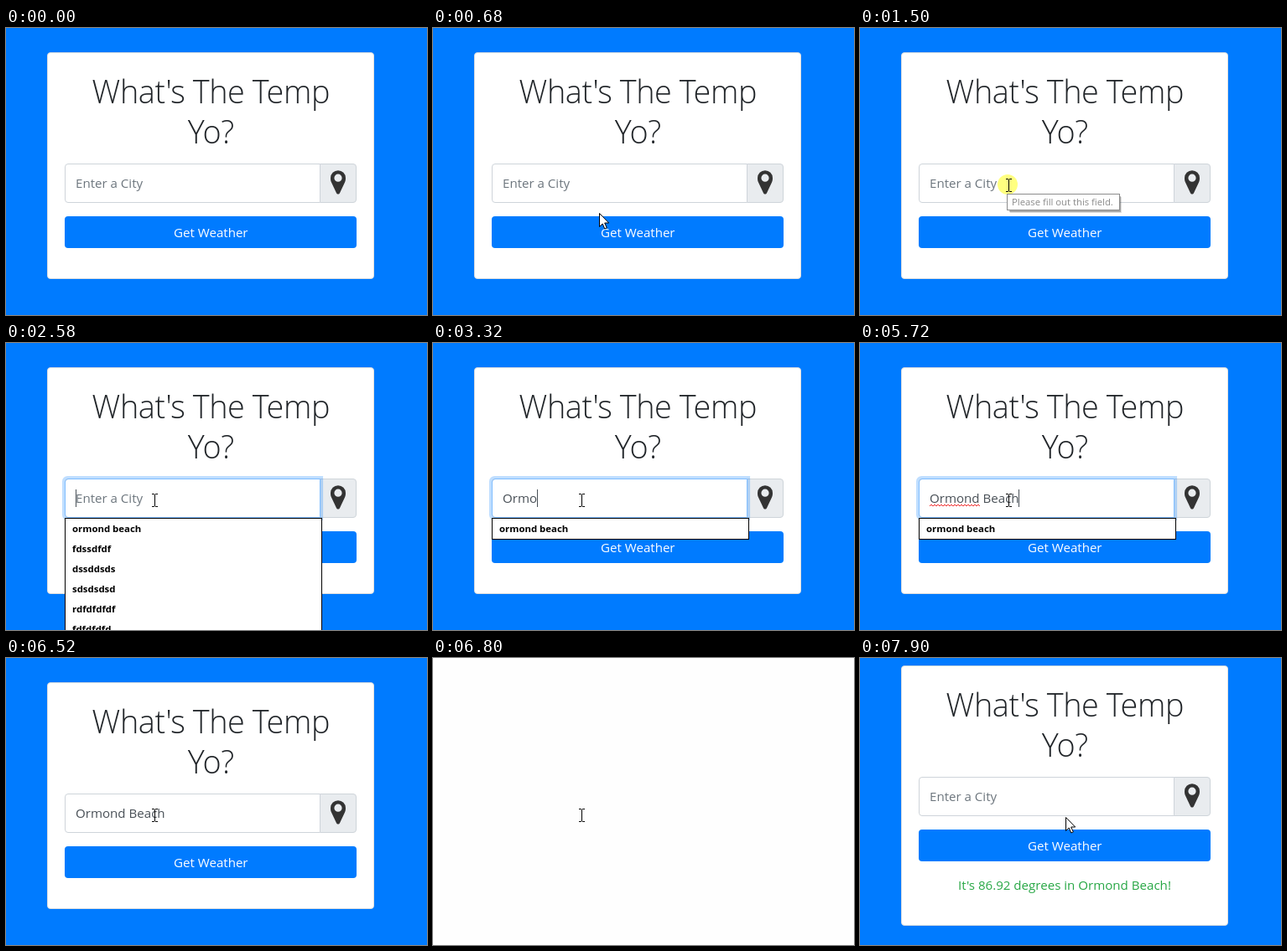
Recreate the animation shown at these times as an HTML page. Size 502 px wide and 343 px high, loop 7950 ms.

```html
<!DOCTYPE html>
<html lang="en">
<head>
<meta charset="utf-8">
<title>What's The Temp Yo?</title>
<style>
  html, body { margin: 0; width: 100%; height: 100%; overflow: hidden; background: #007bff; }
  svg { display: block; width: 502px; height: 343px; }
  text { font-family: "Open Sans", "Noto Sans", sans-serif; font-size: 15.1px; white-space: pre; }
  .title { font-size: 37.8px; font-weight: 300; letter-spacing: -.4px; fill: #212529; }
  .mid { text-anchor: middle; }
  .label { font-weight: 500; fill: #fff; }
  .rows text { font-size: 11.4px; font-weight: 700; }
  .tip text { font-size: 11.3px; fill: #8a8a8a; }
  .crisp { shape-rendering: crispEdges; }
  #press { mix-blend-mode: multiply; }
</style>
</head>
<body>
<svg viewBox="0 0 502 343">
  <rect width="502" height="343" fill="#007bff"/>
  <rect id="card" x="49.5" y="29.5" width="389" height="270" rx="3.5" fill="#fff" stroke="#dfdfdf"/>

  <g id="form">
    <text class="title mid" x="244.3" y="90">What's The Temp</text>
    <text class="title mid" x="244.3" y="138">Yo?</text>

    <path d="M374.5 162.5H414a3.5 3.5 0 0 1 3.5 3.5V205a3.5 3.5 0 0 1-3.5 3.5H374.5z" fill="#e9ecef" stroke="#ced4da"/>
    <path d="M396 198.5c-1 0-1.6-.5-2.1-1.5l-5.9-12.5c-.8-1.6-1-3.5-1-5.3a9 9 0 0 1 18 0c0 1.8-.2 3.7-1 5.3l-5.9 12.5c-.5 1-1.1 1.5-2.1 1.5zM396 174.6a4.6 4.6 0 1 0 0 9.2a4.6 4.6 0 0 0 0-9.2z" fill="#333"/>
    <path d="M374.5 162.5H74a3.5 3.5 0 0 0-3.5 3.5V205a3.5 3.5 0 0 0 3.5 3.5H374.5z" fill="#fff" stroke="#ced4da"/>

    <g id="focus" fill="none">
      <path d="M376.5 160.6H73.5a4.8 4.8 0 0 0-4.9 4.8V205.6a4.8 4.8 0 0 0 4.9 4.8H376.5z" stroke="#007bff" stroke-opacity=".25" stroke-width="3.2"/>
      <path d="M374.5 162.5H74a3.5 3.5 0 0 0-3.5 3.5V205a3.5 3.5 0 0 0 3.5 3.5H374.5z" stroke="#80bdff"/>
    </g>

    <text id="hint" x="83" y="191" fill="#6c757d">Enter a City</text>
    <text id="typed" x="83" y="191" fill="#495057"></text>
    <path id="squiggle" fill="none" stroke="#f03030"/>
    <rect id="caret" class="crisp" y="175" width="1" height="21" fill="#495057"/>

    <rect id="button" x="70" y="225" width="348" height="38" rx="4"/>
    <text class="label mid" x="244.3" y="250">Get Weather</text>
  </g>

  <text id="result" class="mid" x="244" y="277" fill="#28a745">It's 86.92 degrees in Ormond Beach!</text>

  <g id="list" class="rows">
    <rect id="panel" class="crisp" x="70.5" y="209.5" width="306" fill="#fff" stroke="#000"/>
  </g>

  <rect id="blank" width="502" height="343" fill="#fefefe"/>

  <circle id="press" cx="176" cy="187" r="12" fill="#ffff80"/>
  <g id="tip" class="tip">
    <rect x="179" y="202" width="133" height="19" fill="#000" opacity=".12"/>
    <rect x="178" y="201" width="133" height="19" fill="#000" opacity=".25"/>
    <rect x="175.5" y="198.5" width="134" height="19" fill="#fff" stroke="#8c8c8c"/>
    <text x="181" y="212">Please fill out this field.</text>
  </g>

  <path id="beam" class="crisp" d="M-3-8h3v1h-3zM1-8h3v1h-3zM0-7h1v14h-1zM-3 7h3v1h-3zM1 7h3v1h-3z"/>
  <path id="arrow" d="M.5.5V16.5l3.7-3.5 2.6 6 2.5-1.1-2.6-5.900h5z" fill="#fff" stroke="#000"/>
  <path id="hand" d="M-1.5 9V1.5a1.5 1.5 0 0 1 3 0V7l7 1.5q2 .5 2 2.5v4l-2 5H0l-6-8q-.5-2.5 2-2l2.5 2z" fill="#fff" stroke="#000"/>
</svg>

<script>
const LOOP = 7950;
const el = {};
document.querySelectorAll('[id]').forEach(n => el[n.id] = n);

const clamp = v => Math.max(0, Math.min(1, v));
const ramp = (t, a, b) => clamp((t - a) / (b - a));
const within = (t, a, b) => t >= a && t < b;
const show = (node, on) => node.setAttribute('visibility', on ? 'visible' : 'hidden');
const place = (node, x, y) => node.setAttribute('transform', `translate(${Math.round(x)} ${Math.round(y)})`);
const mix = (a, b, p) => a + (b - a) * p;

const ticks = (t, start, step, count) => clamp((Math.floor((t - start) / step) + 1) / count);

const CITY = 'Ormond Beach';
const KEYS = [2760, 3040, 3140, 3320, 3500, 3600, 3680, 3910, 4060, 4240, 4520, 4700];
const ENTRIES = ['ormond beach', 'fdssdfdf', 'dssddsds', 'sdsdsdsd', 'rdfdfdfdf', 'fdfdfdfd'];
const SHORT_ENTRIES = ['ormond beach', 'odfdfdf'];

const rows = ENTRIES.map((_, i) => {
  const row = document.createElementNS('http://www.w3.org/2000/svg', 'text');
  row.setAttribute('x', 79);
  row.setAttribute('y', 226 + 24 * i);
  el.list.append(row);
  return row;
});

let wave = 'M83 195';
for (let x = 85; x <= 143; x += 2) wave += `L${x} ${x % 4 === 1 ? 193 : 195}`;
el.squiggle.setAttribute('d', wave);

function pointer(t) {
  if (t < 250) return null;
  if (t < 1090) {
    const p = ticks(t, 250, 50.7, 15), e = p * (2 - p);
    return [mix(262, 186, e), mix(338, 199, e)];
  }
  if (t < 6850) {
    const p = ticks(t, 1090, 56, 4);
    return [mix(186, 177, p), mix(199, 188, p)];
  }
  if (t < 7440) return null;
  if (t < 7670) return [177, 188];
  const p = ticks(t, 7670, 46, 6);
  return [mix(177, 245, p * p), 188 + 2 * p - 4 * Math.sin(Math.PI * p)];
}

function drawPointer(t, shift) {
  const at = pointer(t);
  let kind = '';
  if (at) {
    const y = at[1] - shift;
    kind = y < 209 ? 'beam' : within(y, 225, 263) ? 'hand' : 'arrow';
  }
  for (const name of ['beam', 'arrow', 'hand']) {
    show(el[name], name === kind);
    if (name === kind) place(el[name], ...at);
  }
  el.button.setAttribute('fill', kind === 'hand' ? '#0069d9' : '#007bff');
}

function drawField(t, done) {
  const count = done ? 0 : KEYS.filter(k => t >= k).length;
  const value = CITY.slice(0, count);
  if (el.typed.textContent !== value) el.typed.textContent = value;
  show(el.hint, !count);
  const width = count ? el.typed.getComputedTextLength() : 0;
  el.caret.setAttribute('x', Math.floor(83 + width));
  show(el.caret, within(t, 1710, 2070) || within(t, 2580, 5210) || within(t, 5720, 6280));
  show(el.squiggle, within(t, 3730, 6280));
  el.focus.setAttribute('opacity', done ? 0 : ramp(t, 1540, 1710) * (1 - ramp(t, 6320, 6520)));
}

function drawList(t) {
  const open = within(t, 1660, 6280);
  el.list.setAttribute('display', open ? 'inline' : 'none');
  if (!open) return;
  const items = t < 2810 ? ENTRIES : t < 3140 ? SHORT_ENTRIES : ['ormond beach'];
  el.panel.setAttribute('height', 1 + 24 * items.length);
  rows.forEach((row, i) => {
    const label = items[i] || '';
    if (row.textContent !== label) row.textContent = label;
  });
}

function draw(t) {
  const done = t >= 6850, shift = done ? -20 : 0;
  place(el.form, 0, shift);
  el.card.setAttribute('y', 29.5 + shift);
  el.card.setAttribute('height', done ? 310 : 270);
  show(el.result, done);
  show(el.blank, within(t, 6800, 6850));

  const pressed = within(t, 1430, 1560);
  show(el.press, pressed);
  show(el.tip, pressed);
  el.tip.setAttribute('opacity', t < 1500 ? .5 : 1);

  drawField(t, done);
  drawList(t);
  drawPointer(t, shift);
}

function frame() {
  draw(performance.now() % LOOP);
  requestAnimationFrame(frame);
}
frame();
</script>
</body>
</html>
```
